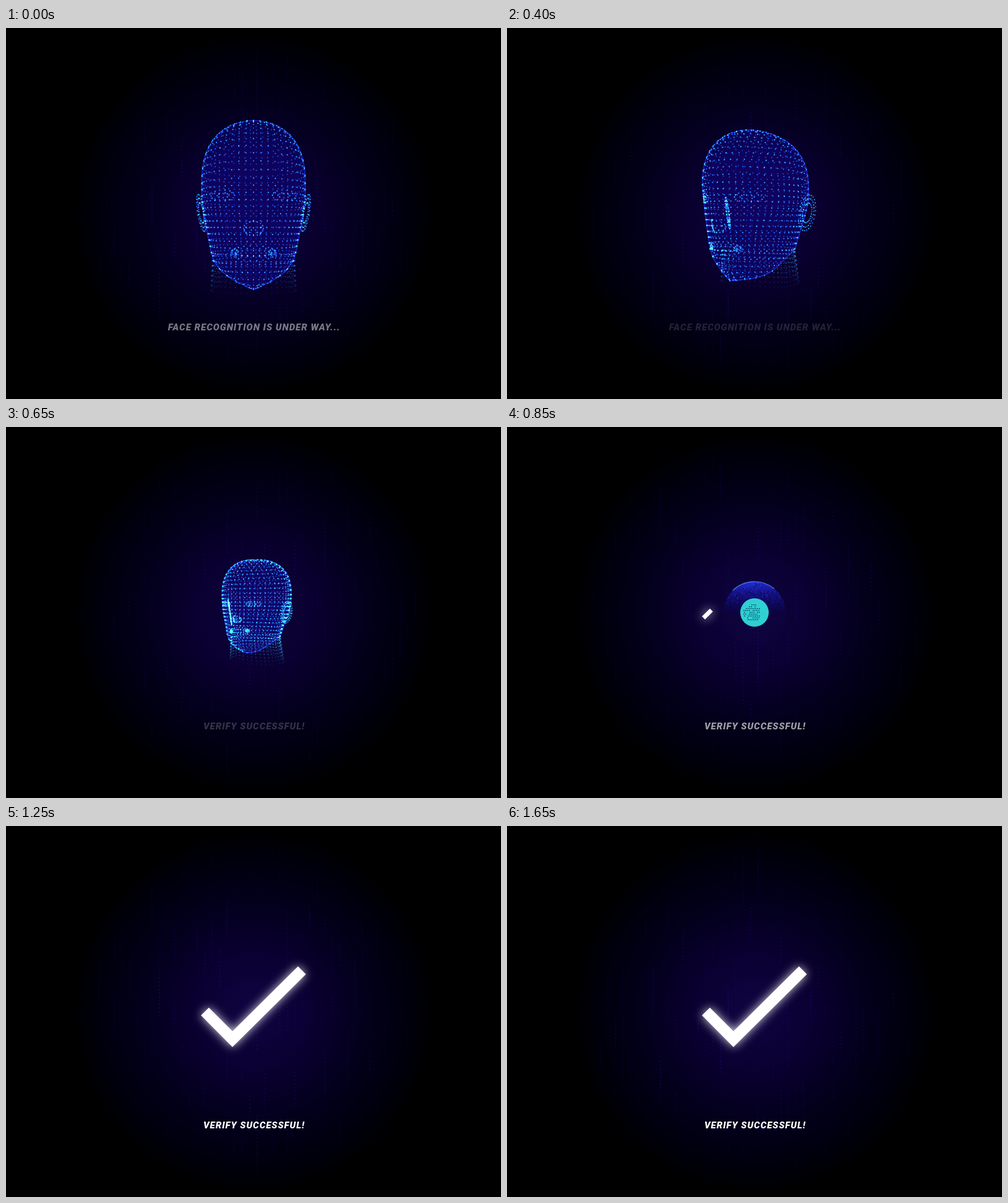
Write an HTML page with a canvas that moves like this. It is 800 by 600 pixels and loops after 1700 ms.

```html
<!DOCTYPE html>
<html lang="en">
<head>
<meta charset="utf-8">
<title>Face recognition</title>
<style>
html, body { margin: 0; width: 100%; height: 100%; overflow: hidden; background: #000; }
canvas { display: block; }
</style>
</head>
<body>
<canvas id="stage" width="800" height="600"></canvas>
<script>
const ctx = document.getElementById('stage').getContext('2d');
const LOOP = 1700, STEP = 50, CX = 400, CY = 300, CAMERA = 800, TAU = Math.PI * 2;

const clamp = v => Math.min(1, Math.max(0, v));
const ramp = (t, from, to) => clamp((t - from) / (to - from));
const mix = (a, b, k) => a + (b - a) * k;
const easeInOut = k => k < .5 ? 2 * k * k : 1 - 2 * (1 - k) * (1 - k);

function seeded(seed) {
  return () => {
    seed = (seed * 1664525 + 1013904223) >>> 0;
    return seed / 4294967296;
  };
}

// Head cross-sections: height, half width, front depth, back depth
const SECTIONS = [
  [-50, 83, 104, 132], [-25, 83, 99, 130], [0, 80, 97, 118], [30, 73, 96, 98], [60, 68, 93, 84]
];

function section(y) {
  if (y < -50) {
    const k = Math.pow(1 - Math.pow(clamp((-50 - y) / 97), 2.4), 1 / 2.4);
    return [83 * k, 104 * k, 132 * k];
  }
  if (y > 60) {
    const u = clamp((y - 60) / 52.5);
    return [68 * Math.pow(1 - Math.pow(u, 1.7), .588), 93 - 22 * u, 0];
  }
  let i = 0;
  while (i < SECTIONS.length - 2 && y > SECTIONS[i + 1][0]) i++;
  const a = SECTIONS[i], b = SECTIONS[i + 1], k = (y - a[0]) / (b[0] - a[0]);
  return [1, 2, 3].map(j => mix(a[j], b[j], k));
}

const nose = (x, y) => 20 * Math.exp(-((x / 12) ** 2) - ((y - 15) / 18) ** 2);

// Half a ring mirrored, so that one column always runs down the middle
function ring(y, [w, front, back], reach, count) {
  const half = Math.max(2, Math.round(count / 2)), points = [];
  for (let i = -half; i <= half; i++) {
    const a = reach * i / (half + .5), x = w * Math.sin(a), c = Math.cos(a);
    points.push({ x, y: y + 2.5 * (1 - c), z: c > 0 ? front * c + nose(x, y) : back * c });
  }
  return points;
}

function buildHead() {
  const skull = [], jaw = [], neck = [], details = [];
  for (let i = 12; i > 0; i--) {
    const y = -50 - 97 * Math.sin(i / 12.4 * Math.PI / 2), shape = section(y);
    skull.push(...ring(y, shape, Math.PI, 48 * shape[0] / 83));
  }
  for (let y = -50; y <= 60; y += 10) skull.push(...ring(y, section(y), Math.PI, 48));
  for (let i = 1; i <= 6; i++) {
    const y = 60 + 52 * Math.sin(i / 6 * Math.PI / 2), shape = section(y);
    jaw.push(...ring(y, shape, Math.PI / 2, 24 * shape[0] / 68));
  }
  for (let y = 66; y <= 126; y += 8) {
    const fade = .5 * (1 - (y - 66) / 66);
    neck.push({ fade, points: ring(y, [66 + (y - 66) / 20, 42, 88 + (y - 66) / 3], Math.PI, 44) });
  }

  const loop = (cx, cy, rx, ry, count) => {
    for (let i = 0; i < count; i++) {
      const a = i / count * TAU, x = cx + rx * Math.cos(a), y = cy + ry * Math.sin(a);
      const [w, front] = section(y);
      details.push({ x, y, z: front * Math.sqrt(Math.max(0, 1 - (x / w) ** 2)) + nose(x, y) });
    }
  };
  for (const side of [-1, 1]) {
    loop(side * 44, -26, 9, 3, 8);
    loop(side * 45, -26, 18, 8, 14);
    loop(side * 27, 56, 4, 4, 8);
    loop(side * 8, 23, 5, 4, 6);
    for (const r of [1, .8, .55]) {
      for (let i = 0; i < 26; i++) {
        const a = i / 26 * TAU, v = Math.cos(a) * r, s = Math.sin(a) * r;
        details.push({ x: side * (88 + 8 * s - 5 * v), y: -1 + 31 * v, z: -34 - 15 * s });
      }
    }
  }
  loop(0, 21, 14, 10, 16);
  loop(0, 57, 27, 4, 20);
  loop(0, 57, 33, 11, 22);
  return { skull, jaw, neck, details };
}

const head = buildHead();

function hull(points) {
  const sorted = [...points].sort((a, b) => a.x - b.x || a.y - b.y);
  const chain = list => {
    const out = [];
    for (const p of list) {
      while (out.length > 1) {
        const a = out[out.length - 2], b = out[out.length - 1];
        if ((b.x - a.x) * (p.y - a.y) - (b.y - a.y) * (p.x - a.x) > 0) break;
        out.pop();
      }
      out.push(p);
    }
    return out;
  };
  return [...chain(sorted), ...chain(sorted.reverse())];
}

function drawBackground(t) {
  const g = ctx.createRadialGradient(CX, CY, 0, CX, CY, 295);
  const lift = ramp(t, 400, 850);
  g.addColorStop(0, `rgb(${mix(11, 16, lift)},${mix(1, 4, lift)},${mix(52, 66, lift)})`);
  g.addColorStop(.34, 'rgb(10,0,48)');
  g.addColorStop(.52, 'rgb(5,0,34)');
  g.addColorStop(.66, 'rgb(2,0,24)');
  g.addColorStop(.84, 'rgb(0,0,13)');
  g.addColorStop(1, '#000');
  ctx.fillStyle = '#000';
  ctx.fillRect(0, 0, 800, 600);
  ctx.fillStyle = g;
  ctx.fillRect(0, 0, 800, 600);
}

// Faint columns of falling dots
function drawRain(t) {
  const rnd = seeded(41);
  for (let col = -22; col <= 22; col++) {
    const x = 406 + col * 12.15;
    for (let strand = 0; strand < 4; strand++) {
      const start = rnd() * 600, length = 4 + Math.floor(rnd() * 9), strength = .15 + rnd() * .4;
      for (let i = 0; i < length; i++) {
        const y = (start + i * 6.1 + 600 * t / LOOP) % 600;
        const fade = clamp(1 - Math.hypot(x - CX, y - CY) / 285);
        ctx.fillStyle = `rgba(34,28,190,${strength * Math.sqrt(fade) * .65})`;
        ctx.fillRect(x - 1, y - 1, 2, 2);
      }
    }
  }
}

// One full turn while the head shrinks away
function drawHead(t) {
  const k = (t / 870) ** 3;
  if (k >= 1) return;
  const cos = Math.cos(k * TAU), sin = Math.sin(k * TAU), tint = ramp(t, 250, 650);
  const project = p => {
    const depth = p.z * cos + p.x * sin, scale = (1 - k) * CAMERA / (CAMERA - depth);
    return { x: CX + scale * (p.x * cos - p.z * sin), y: CY + scale * p.y, depth };
  };

  const dots = (points, front, back) => points.forEach((p, i) => {
    const bright = (i * 7 + Math.floor(i / 5) * 3) % 11 / 10;
    const red = mix(15, 60, bright), green = mix(105, 215, bright) + 25 * tint;
    ctx.fillStyle = `rgba(${red},${green},${mix(250, 215, tint)},${p.depth > 0 ? front : back})`;
    ctx.beginPath();
    ctx.arc(p.x, p.y, 1.1, 0, TAU);
    ctx.fill();
  });

  ctx.save();
  ctx.globalCompositeOperation = 'lighter';
  const body = [...head.skull, ...head.jaw].map(project);
  ctx.beginPath();
  hull(body).forEach(p => ctx.lineTo(p.x, p.y));
  ctx.closePath();
  ctx.fillStyle = 'rgba(10,12,170,.26)';
  ctx.fill();
  ctx.strokeStyle = 'rgba(30,55,240,.6)';
  ctx.lineWidth = 1.4;
  ctx.stroke();
  dots(body, .8, .36);
  dots(head.details.map(project), .8, .75);
  head.neck.forEach(({ points, fade }) => dots(points.map(project), fade, fade));
  ctx.restore();
}

// Flash left behind when the head collapses
function drawBurst(t) {
  const size = (t - 800) / 50, alpha = 1 - ramp(t, 850, 1000);
  if (size <= 0 || alpha <= 0) return;
  const r = 50 * size, rnd = seeded(9);
  ctx.save();
  ctx.translate(CX, CY);
  ctx.globalAlpha = alpha;
  const g = ctx.createLinearGradient(0, -r, 0, 0);
  g.addColorStop(0, 'rgb(35,45,215)');
  g.addColorStop(.35, 'rgb(20,18,135)');
  g.addColorStop(1, 'rgba(12,4,75,.4)');
  ctx.fillStyle = g;
  ctx.beginPath();
  ctx.arc(0, 0, r, Math.PI, TAU);
  ctx.fill();
  for (let i = 0; i < 260; i++) {
    const a = Math.PI * (1 + rnd()), d = r * Math.sqrt(rnd()), top = -Math.sin(a) * d / r;
    ctx.fillStyle = rnd() < .5 ? `rgba(50,70,255,${top * .7})` : 'rgba(5,0,45,.5)';
    ctx.fillRect(Math.cos(a) * d, Math.sin(a) * d, 1.5, 1.5);
  }
  ctx.strokeStyle = 'rgba(90,150,255,.8)';
  ctx.lineWidth = 1.2;
  ctx.beginPath();
  ctx.arc(0, 0, r, Math.PI * 1.25, Math.PI * 1.72);
  ctx.stroke();
  ctx.fillStyle = 'rgb(47,208,210)';
  ctx.beginPath();
  ctx.arc(0, 0, 23 * size, 0, TAU);
  ctx.fill();
  ctx.fillStyle = 'rgb(8,55,90)';
  for (let y = -13; y <= 13; y += 3) {
    for (let x = -18; x <= 9; x += 3) {
      if (((x + 5) / 14) ** 2 + (y / 14) ** 2 < 1 && rnd() < .8) {
        ctx.fillRect((x + (y & 1)) * size, y * size, 1.7, 1.3);
      }
    }
  }
  ctx.restore();
}

function drawCheck(t) {
  const k = easeInOut(ramp(t, 800, 1200));
  if (!k) return;
  const points = [[321.5, 300], [366, 344.7], [478.3, 233.3]];
  const lengths = [1, 2].map(i => Math.hypot(points[i][0] - points[i - 1][0], points[i][1] - points[i - 1][1]));
  let left = k * (lengths[0] + lengths[1]);
  ctx.save();
  ctx.strokeStyle = '#fff';
  ctx.lineWidth = 18;
  ctx.lineJoin = 'miter';
  ctx.shadowColor = 'rgba(255,255,255,.85)';
  ctx.shadowBlur = 16;
  ctx.beginPath();
  ctx.moveTo(...points[0]);
  for (let i = 0; i < 2 && left > 0; i++) {
    const part = Math.min(1, left / lengths[i]);
    ctx.lineTo(mix(points[i][0], points[i + 1][0], part), mix(points[i][1], points[i + 1][1], part));
    left -= lengths[i];
  }
  ctx.stroke();
  ctx.restore();
}

function drawCaption(text, alpha) {
  if (alpha <= 0) return;
  ctx.font = 'italic 900 15px Roboto, sans-serif';
  ctx.letterSpacing = '1px';
  ctx.textAlign = 'center';
  ctx.fillStyle = `rgba(255,255,255,${alpha})`;
  ctx.fillText(text, 401, 489);
}

function draw(t) {
  drawBackground(t);
  drawRain(t);
  drawHead(t);
  drawBurst(t);
  drawCheck(t);
  drawCaption('FACE RECOGNITION IS UNDER WAY...', .47 * (1 - ramp(t, 0, 560)));
  drawCaption('VERIFY SUCCESSFUL!', ramp(t, 555, 1030));
}

function tick(now) {
  draw(Math.floor(now % LOOP / STEP) * STEP);
  requestAnimationFrame(tick);
}
draw(0);
requestAnimationFrame(tick);
</script>
</body>
</html>
```
